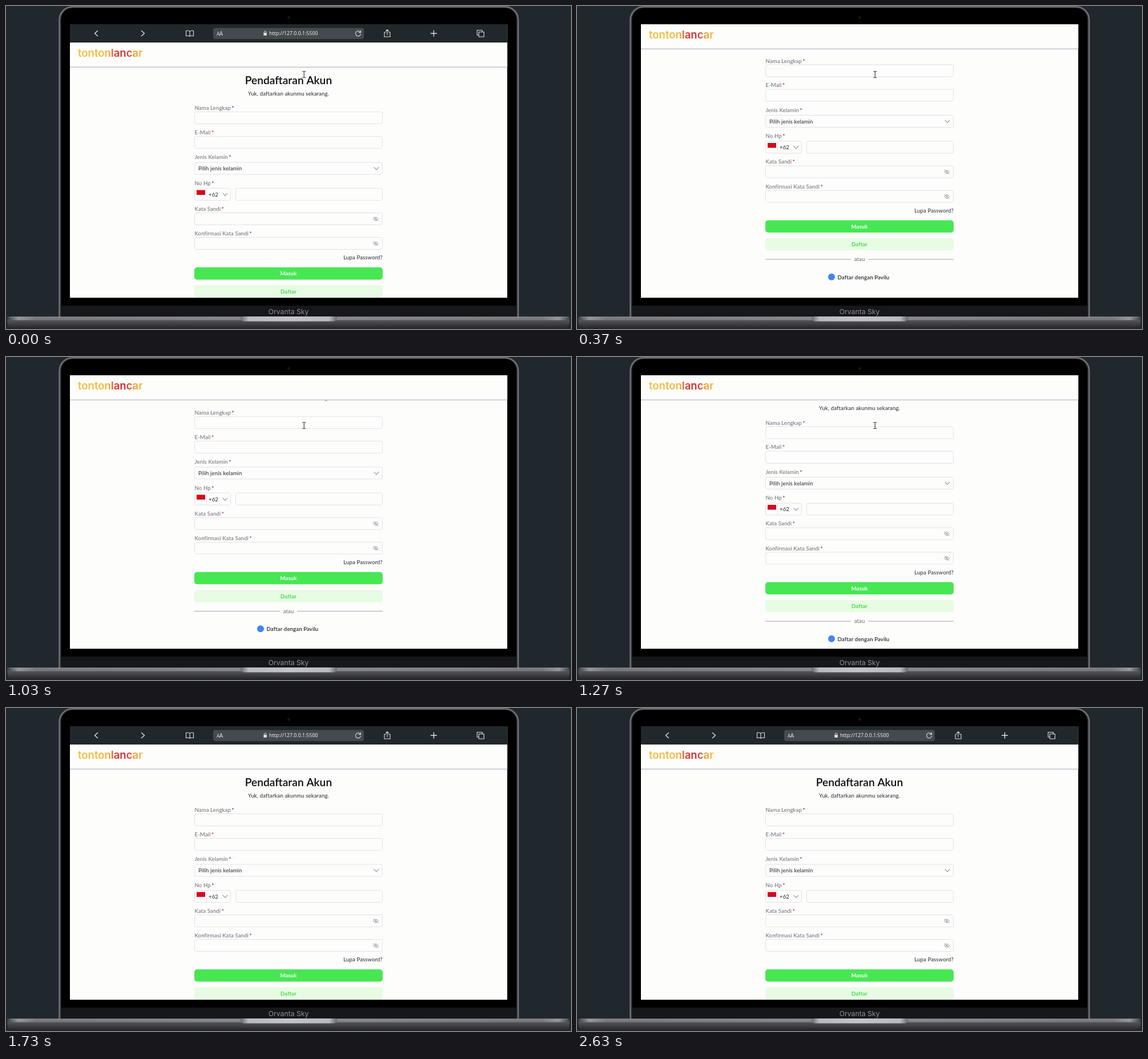
An HTML page with a canvas for the animation above (2.66 s loop, 990 by 566 pixels).

```html
<!DOCTYPE html>
<html lang="id">
<head>
<meta charset="utf-8">
<title>Pendaftaran Akun</title>
<style>
html, body { margin: 0; width: 100%; height: 100%; overflow: hidden; background: #21282d; }
canvas { display: block; }
</style>
</head>
<body>
<canvas id="stage" width="990" height="566"></canvas>
<script>
const ctx = document.getElementById('stage').getContext('2d');
const LOOP = 2660;
const SCREEN = { x: 112, y: 32, w: 766.5, h: 479.5 };
const BAR = 32;
const LEFT = 330, RIGHT = 660, MID = 495;
const INK = '#24282d', LABEL = '#696b72', EDGE = '#e2e2eb', PAGE = '#fdfdfc';

// Page scroll as [time, offset], and the span in which the toolbar is folded away.
const SCROLL = [[70, 0], [170, 15], [250, 38], [340, 50.5], [1000, 50.5], [1030, 49.2],
  [1150, 42], [1270, 31.7], [1330, 16], [1390, 0]];
const FOLD = [170, 1360];
const CURSOR_END = 1670;

function scrollAt(t) {
  const i = SCROLL.findIndex(key => key[0] > t);
  if (i < 1) return 0;
  const [t0, a] = SCROLL[i - 1], [t1, b] = SCROLL[i];
  return a + (b - a) * (t - t0) / (t1 - t0);
}

function box(x, y, w, h, r, fill, stroke, width = 1) {
  ctx.beginPath();
  ctx.roundRect(x, y, w, h, r);
  if (fill) { ctx.fillStyle = fill; ctx.fill(); }
  if (stroke) { ctx.strokeStyle = stroke; ctx.lineWidth = width; ctx.stroke(); }
}

function line(path, color, width = 1) {
  ctx.strokeStyle = color;
  ctx.lineWidth = width;
  ctx.stroke(new Path2D(path));
}

function iconAt(x, y, path, color, width) {
  ctx.save();
  ctx.translate(x, y);
  ctx.lineCap = ctx.lineJoin = 'round';
  line(path, color, width);
  ctx.restore();
}

function text(str, x, y, { color = INK, size = 9.58, weight = 400, align = 'left',
  family = 'Lato', spacing = 0.12 } = {}) {
  ctx.font = `${weight} ${size}px ${family}, sans-serif`;
  ctx.letterSpacing = spacing + 'px';
  ctx.textAlign = align;
  ctx.fillStyle = color;
  ctx.fillText(str, x, y);
  return ctx.measureText(str).width;
}

function gradient(x0, y0, x1, y1, stops) {
  const g = ctx.createLinearGradient(x0, y0, x1, y1);
  stops.forEach(([at, color]) => g.addColorStop(at, color));
  return g;
}

function drawLaptop() {
  ctx.fillStyle = '#21282d';
  ctx.fillRect(0, 0, 990, 566);
  box(92, 0, 807, 570, [24, 24, 0, 0], '#38383c');
  box(93.5, 1.2, 804, 570, [23, 23, 0, 0], null, '#77777e', 2);
  box(96.5, 3.5, 798, 545, [20, 20, 0, 0], '#000');
  ctx.fillStyle = '#161718';
  ctx.fillRect(96.5, 525, 798, 20);
  box(493, 18, 4.5, 4.5, 2.25, '#17191c');
  text('Orvanta Sky', MID, 539.5,
    { color: '#929294', size: 12.2, family: 'Inter', align: 'center', spacing: 0 });

  box(2, 550, 986, 30, [0, 0, 30, 30],
    gradient(0, 550, 0, 566, [[0, '#55555a'], [0.4, '#414146'], [0.75, '#2e2f33'], [1, '#222326']]));
  ctx.fillStyle = gradient(2, 0, 988, 0, [[0, '#3c3d42'], [0.02, '#97979d'], [0.05, '#77777d'],
    [0.4, '#85858b'], [0.6, '#85858b'], [0.95, '#77777d'], [0.98, '#97979d'], [1, '#3c3d42']]);
  ctx.fillRect(2, 544.5, 986, 6);
  ctx.fillStyle = 'rgba(195,195,202,.45)';
  ctx.fillRect(6, 544.5, 978, 1);
  box(411, 544, 169, 8.5, [0, 0, 6, 6],
    gradient(411, 0, 580, 0, [[0, '#66666c'], [0.08, '#b9b9c0'], [0.5, '#c3c3c9'], [0.92, '#b9b9c0'], [1, '#66666c']]));
}

function drawToolbar() {
  const ink = '#dfe1e2';
  ctx.fillStyle = '#21282b';
  ctx.fillRect(SCREEN.x, SCREEN.y, SCREEN.w, BAR);
  box(363, 38.5, 264, 19.5, 4, '#454a4e');
  iconAt(158, 48, 'M2.5 -4.5 L-2.5 0 L2.5 4.5', ink, 1.4);
  iconAt(240, 48, 'M-2.5 -4.5 L2.5 0 L-2.5 4.5', ink, 1.4);
  iconAt(322, 48, 'M0 -3.5 Q-3 -6 -6.5 -4.5 V4.5 Q-3 3.2 0 5 Q3 3.2 6.5 4.5 V-4.5 Q3 -6 0 -3.5 V5', ink, 1.1);
  iconAt(617, 48, 'M4.2 -1.5 A4.5 4.5 0 1 0 4.5 1 M4.4 -5 V-1.5 H1', ink, 1.1);
  iconAt(668, 48, 'M-2.5 -2 H-5 V6 H5 V-2 H2.5 M0 2.5 V-6.5 M-2.5 -4 L0 -6.5 L2.5 -4', ink, 1.1);
  iconAt(749.5, 48, 'M-5 0 H5 M0 -5 V5', ink, 1.4);
  iconAt(831.5, 48, 'M-3 -2.5 H6 V6 H-3 Z M-3 3 H-6 V-5.5 H3 V-2.5', ink, 1.1);
  text('A', 369, 51.7, { color: ink, size: 8, family: 'Noto Sans', spacing: 0 });
  text('A', 373.8, 51.7, { color: ink, size: 10, family: 'Noto Sans', spacing: 0 });
  box(451.3, 47, 5.6, 4.8, 0.8, ink);
  iconAt(454.1, 47, 'M-1.7 0 V-1.3 A1.7 1.7 0 0 1 1.7 -1.3 V0', ink, 1);
  text('http://127.0.0.1:5500', 461, 51.4,
    { color: '#f1f1f1', size: 8.75, family: 'Noto Sans', spacing: 0 });
}

function drawHeader(top) {
  ctx.fillStyle = PAGE;
  ctx.fillRect(SCREEN.x, top, SCREEN.w, 42.5);
  ctx.fillStyle = '#d4d4dc';
  ctx.fillRect(SCREEN.x, top + 42, SCREEN.w, 2);
  ctx.fillStyle = 'rgba(212,212,220,.3)';
  ctx.fillRect(SCREEN.x, top + 44, SCREEN.w, 1);
  text('tontonlancar', 126, top + 25, {
    size: 18.5, weight: 600, family: 'Inter', spacing: 0,
    color: gradient(126, 0, 242, 0, [[0, '#f5c045'], [0.46, '#f4b93f'], [0.54, '#e2482f'],
      [0.68, '#d92532'], [0.79, '#e5502f'], [0.86, '#f3a53b'], [1, '#f5c045']])
  });
}

function label(str, y) {
  const width = text(str, LEFT + 0.5, y + 3.5, { color: LABEL });
  text('*', LEFT + width + 2, y + 3.5, { color: '#c0242c', weight: 700 });
}

function field(y, x = LEFT, right = RIGHT) {
  box(x + 0.5, y + 0.5, right - x - 1, 21, 3, PAGE, EDGE);
}

function chevron(x, y) {
  iconAt(x, y, 'M-4 -2 L0 2.2 L4 -2', '#92949c', 1.1);
}

function hiddenEye(y) {
  iconAt(648, y, 'M-4.7 0 Q0 -6 4.7 0 Q0 6 -4.7 0 M-4 -3.7 L4 3.7', '#9a9ca3', 1);
  box(646.5, y - 1.5, 3, 3, 1.5, '#a3a5ab');
}

function drawForm() {
  text('Pendaftaran Akun', MID, 136.8, { color: '#0b0b0d', size: 19.2, weight: 600, align: 'center', spacing: 0 });
  text('Yuk, daftarkan akunmu sekarang.', MID, 156.5, { align: 'center' });

  label('Nama Lengkap', 178.5);
  field(185);
  label('E-Mail', 221.3);
  field(228);

  label('Jenis Kelamin', 264.8);
  field(273.5);
  text('Pilih jenis kelamin', 337, 288.3);
  chevron(649, 284.7);

  label('No Hp', 310.3);
  field(319, LEFT, 394);
  ctx.fillStyle = '#fff';
  ctx.fillRect(334, 331, 15, 7);
  ctx.fillStyle = '#d40a1c';
  ctx.fillRect(334, 322.5, 15, 8.5);
  line('M351.5 319.5 V340.5', EDGE);
  text('+62', 355, 333.8);
  chevron(384, 330.2);
  field(319, 402);

  label('Kata Sandi', 355.3);
  field(362);
  hiddenEye(373.2);
  label('Konfirmasi Kata Sandi', 398.5);
  field(405);
  hiddenEye(416.3);
  text('Lupa Password?', RIGHT, 444, { align: 'right' });

  box(LEFT, 458, 330, 21.5, 5, '#47e753');
  text('Masuk', MID, 472.3, { color: '#fff', weight: 700, align: 'center' });
  box(LEFT, 489.3, 330, 21.5, 5, '#e7fce3');
  text('Daftar', MID, 503.8, { color: '#49d950', weight: 700, align: 'center' });

  line('M330 526.5 H480 M510 526.5 H660', '#9da1ac');
  text('atau', MID, 529.7, { color: LABEL, align: 'center' });
  box(440, 551.3, 12, 12, 6, '#4285f4');
  text('Daftar dengan Pavilu', 456.5, 561, { weight: 600 });
}

function drawCursor() {
  line('M519.5 114.5 H521.5 L522.2 115.2 L523 114.5 H525 M522.2 115 V125 M519.5 125.5 H521.5 L522.2 124.8 L523 125.5 H525', '#1b1b1d');
}

function render(t) {
  const folded = t >= FOLD[0] && t < FOLD[1];
  const bar = folded ? 0 : BAR;
  drawLaptop();
  ctx.save();
  ctx.beginPath();
  ctx.rect(SCREEN.x, SCREEN.y, SCREEN.w, SCREEN.h);
  ctx.clip();
  ctx.fillStyle = PAGE;
  ctx.fillRect(SCREEN.x, SCREEN.y, SCREEN.w, SCREEN.h);
  ctx.save();
  ctx.translate(0, bar - BAR - scrollAt(t));
  drawForm();
  ctx.restore();
  drawHeader(SCREEN.y + bar);
  if (!folded) drawToolbar();
  if (t < CURSOR_END) drawCursor();
  ctx.restore();
}

function tick() {
  render(performance.now() % LOOP);
  requestAnimationFrame(tick);
}
tick();
</script>
</body>
</html>
```
